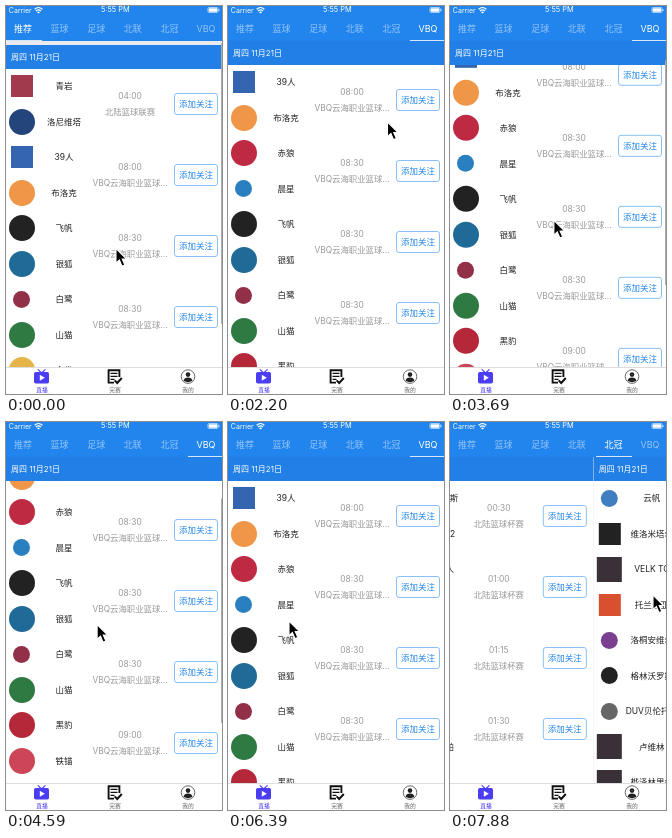
These frames come from a looping animation (216x388 px, 8000 ms). An HTML page:

```html
<!DOCTYPE html>
<html lang="zh-CN">
<head>
<meta charset="utf-8">
<title>赛程</title>
<style>
html, body { margin: 0; width: 100%; height: 100%; overflow: hidden; background: #fff; }
body { font-family: Inter, "Noto Sans CJK SC", "Noto Sans CJK", sans-serif; }
#stage { position: relative; width: 216px; height: 388px; overflow: hidden; }
#stage div, #stage svg { position: absolute; }
.t { white-space: nowrap; line-height: 1; transform: translate(-50%, -50%); }
#view { left: 0; top: 35px; width: 216px; height: 326px; overflow: hidden; }
.page { top: 0; width: 219px; height: 326px; background: #e9eaee; overflow: hidden; }
.list { left: 0; top: 0; width: 219px; background: #fff; }
.head { left: 0; width: 219px; height: 23.5px; background: #217fe6; color: #fff; z-index: 1; }
.head span { position: absolute; left: 5px; top: 7.5px; font-size: 8px; line-height: 9px; white-space: nowrap; }
.name { font-size: 8.5px; color: #222; }
.info { font-size: 8.4px; color: #999; }
.btn { left: 168px; width: 42px; height: 20px; border: 1px solid #8ac0f6; border-radius: 3px; }
.bar { left: 215px; width: 2px; border-radius: 1px; background: #a9acb2; }
#top { left: 0; top: 0; width: 216px; height: 35px; background: #2285ed; color: #fff; }
#line { top: 34px; width: 36px; height: 1px; background: #d5e7fc; }
#foot { left: 0; top: 361px; width: 216px; height: 27px; background: #fff; border-top: 1px solid #ddd; box-sizing: border-box; }
</style>
</head>
<body>
<div id="stage">
  <div id="view"></div>
  <div id="top">
    <svg width="216" height="10">
      <path d="M28.6 3.2Q32.5 -.2 36.4 3.2M30 5Q32.5 2.9 35 5" fill="none" stroke="#fff" stroke-width="1.2"/>
      <path d="M31 6.2Q32.5 5 34 6.2L32.5 7.6Z" fill="#fff"/>
      <rect x="201.9" y="1.5" width="10.2" height="5" rx="1.3" fill="none" stroke="#fff" stroke-width=".6"/>
      <rect x="202.7" y="2.3" width="8.6" height="3.4" rx=".6" fill="#fff"/>
      <path d="M213 3.2v1.7" stroke="#fff" stroke-width=".8"/>
    </svg>
    <div id="line"></div>
  </div>
  <div id="foot">
    <svg width="216" height="27" viewBox="0 361.6 216 27" style="top:-1px">
      <path d="M31.8 364L35.6 367.5L39.5 364" fill="none" stroke="#4b3df2" stroke-width="1.2"/>
      <rect x="28" y="366.6" width="15" height="11.6" rx="1.8" fill="#4b3df2"/>
      <path d="M33.8 369.4V375.4L38.8 372.4Z" fill="#fff"/>
      <g fill="none" stroke="#111" stroke-width="1.9">
        <path d="M108 377.2H102.6V364.8H113.4V371.5"/>
        <path d="M104.5 368H111.5M104.5 371H111.5M104.5 374H108.5" stroke-width="1.4"/>
        <path d="M108.6 375L111.2 377.6L115.8 372.6" stroke-width="2"/>
      </g>
      <circle cx="182" cy="371.2" r="6.8" fill="#fff" stroke="#444" stroke-width=".8"/>
      <circle cx="182" cy="369.2" r="2.3" fill="#222"/>
      <path d="M177.6 375.4Q178.2 372.2 182 372.2T186.4 375.4Q182 378.2 177.6 375.4Z" fill="#222"/>
    </svg>
  </div>
  <svg id="cursor" width="14" height="20" viewBox="-1 -1 14 20" style="left:-1px;top:-1px">
    <path d="M0 0V14.6L3.4 11.5L6 17.6L8.8 16.4L6.2 10.5H10.6Z" fill="#000" stroke="#fff" stroke-width="1.1"/>
  </svg>
</div>
<script>
const $ = id => document.getElementById(id);
const PITCH = 219, ROW = 71, HEAD = 23.5, VIEW = 326;
const DAY = '周四 11月21日';

// team marks by kind; anything else gets the default square
const KINDS = [
  { size: 26, radius: '50%', teams: {
    '洛尼维塔': '#24447c', '布洛克': '#ef9648', '飞帆': '#222', '银狐': '#1f6a96', '山猫': '#2f7a43',
    '金雀': '#e5b54a', '赤狼': '#bd2a42', '黑豹': '#b5283a', '铁锚': '#cc4657' } },
  { size: 17, radius: '50%', teams: {
    '白鹭': '#923048', '晨星': '#2a7fc0', '沧浪现代红日神': '#e8912f', '云泽': '#333', '云帆': '#3f7fc0',
    '洛桐安维尔': '#7a3f8f', '格林沃罗斯': '#222', 'DUV贝伦托克': '#666' } },
  { size: 22, radius: 0, teams: {
    '青岩': '#a03a4c', '39人': '#3565b0', '维洛米塔尔': '#222', '托兰迪亚': '#d8502f' } }
];
const PRO = 'VBQ云海职业篮球...', CUP = '北陆篮球杯赛', TITLE = 'QUVO冠军联赛';
const EAST = '东屿篮球赛', SOUTH = '南屿男子篮球联赛';
const stars = [
  ['08:00', '39人', '布洛克', PRO], ['08:30', '赤狼', '晨星', PRO], ['08:30', '飞帆', '银狐', PRO],
  ['08:30', '白鹭', '山猫', PRO], ['09:00', '黑豹', '铁锚', PRO], ['09:30', '金雀', '海燕', PRO]
];
// each page: day headings (strings) and games (arrays)
const PAGES = [
  [DAY, ['04:00', '青岩', '洛尼维塔', '北陆篮球联赛'], stars[0], stars[2], stars[3], ['09:00', '金雀', '铁锚', PRO]],
  ['正在直播', ['18:00', '松川青石大鹿', '平岭TQV', EAST], ['18:00', '青原六星疾风', '沧浪现代红日神', EAST],
    '周三 11月20日', ['19:35', '云泽', '云泽赤霄骑士', SOUTH], ['19:35', '白洲飞狮', '蓝湾远航者', SOUTH]],
  [DAY, ['01:00', '青岩', '云帆', CUP], ['01:00', '银狐', '白鹭', CUP]],
  [DAY, ['00:30', '科林格拉瓦斯', '维罗沃克T2', CUP], ['01:00', '洛文塔尔人', '里沃纳', CUP],
    ['01:15', '塔维尔', '莫林诺', CUP], ['01:30', '布兰沃塔', '南桐里维帕', CUP], ['02:00', '维兰', '托罗', CUP]],
  [DAY, ['01:00', '云帆', '维洛米塔尔', TITLE], ['01:00', 'VELK TC', '托兰迪亚', TITLE],
    ['01:00', '洛桐安维尔', '格林沃罗斯', TITLE], ['01:30', 'DUV贝伦托克', '卢维林', TITLE],
    ['02:00', '桦泽林里格', '托维恩', TITLE]],
  [DAY, ...stars, '周五 11月22日']
];

function add(parent, cls, style = {}, text = '') {
  const el = document.createElement('div');
  el.className = cls;
  el.textContent = text;
  for (const k in style) el.style[k] = typeof style[k] === 'number' ? style[k] + 'px' : style[k];
  parent.append(el);
  return el;
}
const label = (parent, text, x, y, cls, style = {}) =>
  add(parent, 't ' + cls, { left: x, top: y, ...style }, text);

function addTeam(list, name, y) {
  const kind = KINDS.find(k => name in k.teams) || { size: 25, radius: 0, teams: {} };
  const { size, radius } = kind;
  add(list, '', {
    left: 15.5 - size / 2, top: y - size / 2, width: size, height: size,
    background: kind.teams[name] || '#3a3038', borderRadius: radius
  });
  label(list, name, 58, y, 'name');
}

function addGame(list, [time, home, away, league], top) {
  const mid = top + ROW / 2;
  addTeam(list, home, mid - ROW / 4);
  addTeam(list, away, mid + ROW / 4);
  label(list, time, 124, mid - 8.5, 'info');
  label(list, league, 124, mid + 7.7, 'info');
  add(list, 'btn', { top: mid - 11 });
  label(list, '添加关注', 190, mid, 'name', { color: '#2286ea' });
}

const pages = PAGES.map(items => {
  const el = add($('view'), 'page');
  const list = add(el, 'list');
  let y = 0, head;
  for (const item of items) {
    if (typeof item === 'string') {
      const h = add(list, 'head', { top: y });
      h.innerHTML = `<span>${item}</span>`;
      head = head || h;
      y += HEAD;
    } else {
      addGame(list, item, y);
      y += ROW;
    }
  }
  list.style.height = Math.max(y, VIEW + 20) + 'px';
  const ratio = VIEW / y;
  const bar = add(el, 'bar', { top: 2, height: VIEW * ratio });
  return { el, list, head, bar, ratio };
});

label($('top'), 'Carrier', 14.3, 4.2, '', { fontSize: 7 });
label($('top'), '5:55 PM', 109.3, 4.2, '', { fontSize: 7.4, fontWeight: 700 });
const tabs = ['推荐', '篮球', '足球', '北联', '北冠', 'VBQ'].map((text, i) =>
  label($('top'), text, 17 + 36.6 * i, 22, '', { fontSize: 9 }));
['直播', '完赛', '我的'].forEach((text, i) =>
  label($('foot'), text, 36 + 73 * i, 22, '', { fontSize: 5.8, color: i ? '#666' : '#4b3df2' }));

const STEP = 148.5, LEAD = 30, LAST_STEP = 53;
const clamp = u => Math.min(1, Math.max(0, u));
function ramp(t, from, to) {
  const u = clamp((t - from) / (to - from));
  return u * u * (3 - 2 * u);
}
const bump = (t, from, to) => Math.sin(Math.PI * clamp((t - from) / (to - from))) ** 2;

// tap on the last tab, then two swipes back: drag, release, drag
const pageAt = t => 5 * ramp(t, 8.2, 12)
  - .25 * ramp(t, 45, 46) - .75 * ramp(t, 47, 48.4) - ramp(t, 51, 54.3);
const settle = t => -4 * .5 ** t;
// pull down, two flicks up, return with a bounce
const scrollAt = t => -10 * bump(t, 17, 23) + 34 * ramp(t, 23, 26) + 31 * ramp(t, 29, 32)
  - 65 * ramp(t, 33, 36) - 3 * bump(t, 35, 39);

// pointer moves: from step, to step, x, y
const MOVES = [[0, 8, 194, 26], [10, 20, 125, 206], [22, 26, 100, 216], [29, 32, 88, 198], [33, 37, 23, 216],
  [37, 39, 58, 199], [42, 44, 64, 199], [45, 46, 112, 192], [47, 48, 121, 191], [49, 53, 203, 173]];
const pointerAt = t => MOVES.reduce(([x, y], [from, to, nx, ny]) => {
  const u = ramp(t, from, to);
  return [x + (nx - x) * u, y + (ny - y) * u];
}, [110, 242.5]);

function render(ms) {
  const t = Math.min(LAST_STEP, Math.floor((ms + LEAD) / STEP));
  const pos = pageAt(t);
  const active = t < 11 ? 0 : t < 49 ? 5 : 4;
  const scrolls = { 0: settle(t), 5: scrollAt(t) };
  const barOn = { 0: t < 11, 5: t > 16 && t < 41 };
  pages.forEach((p, i) => {
    const scroll = scrolls[i] || 0, down = Math.max(0, scroll);
    const x = (i - pos) * PITCH;
    p.el.style.transform = `translateX(${x}px)`;
    p.el.style.visibility = Math.abs(x) < PITCH ? 'visible' : 'hidden';
    p.list.style.transform = `translateY(${-scroll}px)`;
    p.head.style.transform = `translateY(${down}px)`;
    p.bar.style.transform = `translateY(${down * p.ratio}px)`;
    p.bar.style.opacity = barOn[i] ? 1 : 0;
  });
  tabs.forEach((el, i) => { el.style.color = i === active ? '#fff' : '#94c4f7'; });
  $('line').style.left = active * 36.4 + 'px';
  const [x, y] = pointerAt(t);
  $('cursor').style.transform = `translate(${x}px, ${y}px)`;
}

const start = performance.now();
function loop() {
  render((performance.now() - start) % 8000);
  requestAnimationFrame(loop);
}
loop();
</script>
</body>
</html>
```
